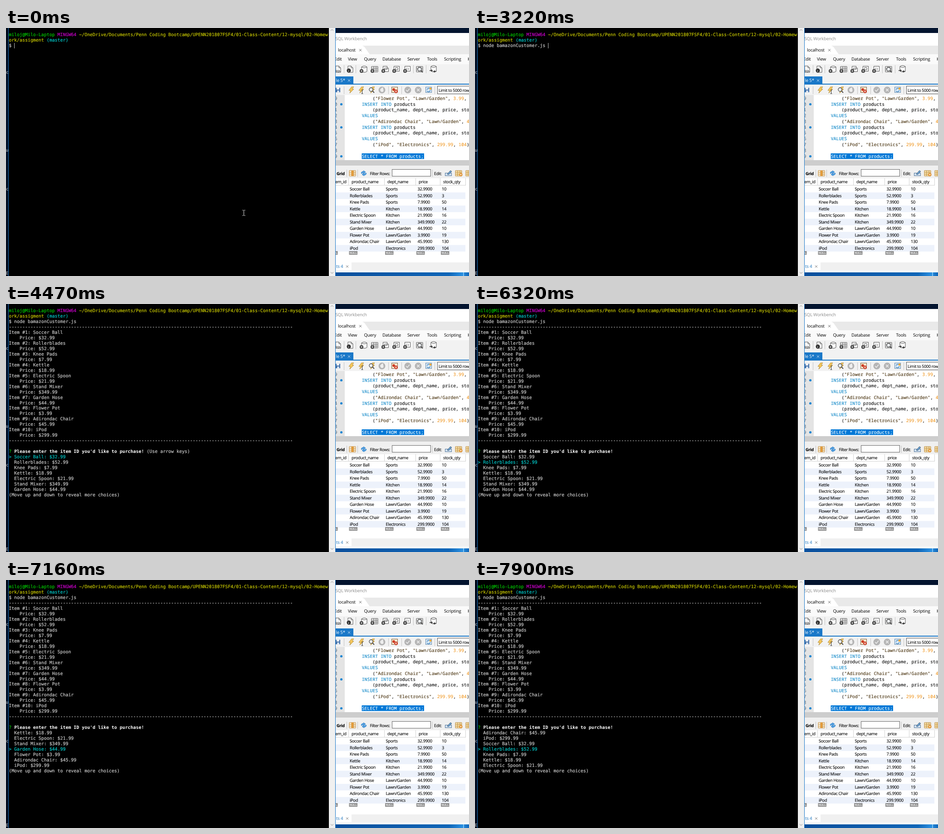
An HTML page that plays this animation: 1021x548 px, repeating every 8000 ms.

```html
<!DOCTYPE html>
<html lang="en">
<head>
<meta charset="utf-8">
<title>Terminal session</title>
<style>
  html, body { margin: 0; width: 100%; height: 100%; overflow: hidden; background: #000; }
  svg { display: block; }
  text { white-space: pre; text-rendering: geometricPrecision; fill: currentColor; }
  .term { font: 9.92px "DejaVu Sans Mono", monospace; color: #c8c8c8; stroke: currentColor; stroke-width: .22; }
  .code { font: 9.88px "Noto Sans Mono", monospace; color: #111; stroke: currentColor; stroke-width: .12; }
  .menu { font: 9.7px "Open Sans", sans-serif; letter-spacing: -.2px; color: #000; }
  .ui { font: 9.3px "Open Sans", sans-serif; letter-spacing: -.3px; color: #000; stroke: currentColor; stroke-width: .12; }
  .small { font-size: 9px; }
  .null { font: bold 6px "Liberation Sans", sans-serif; color: #fff; }
  .g { color: #00c400; } .m { color: #c400c4; } .y { color: #c4c400; } .c { color: #00c4c4; }
  .b { color: #fff; font-weight: bold; stroke: none; }
  .kw { color: #0a85c7; } .num { color: #f09a28; } .str { color: #4a3410; }
</style>
</head>
<body>
<svg id="stage" width="1021" height="548" viewBox="0 0 1021 548">
  <defs>
    <linearGradient id="desk" x2="0" y2="1">
      <stop stop-color="#020a18"/><stop offset=".25" stop-color="#03142e"/><stop offset="1" stop-color="#020a1a"/>
    </linearGradient>
    <linearGradient id="bar">
      <stop stop-color="#0a4f9c"/><stop offset=".85" stop-color="#0f66b8"/><stop offset=".95" stop-color="#2a8fe0"/><stop offset="1" stop-color="#0f66b8"/>
    </linearGradient>
  </defs>
  <g id="app"></g>
  <g id="frame"></g>
  <g id="term" class="term"></g>
  <path id="mouse" d="M521.5 402.5h2l1 1 1-1h2M524.5 403v11M521.5 414.5h2l1-1 1 1h2" fill="none" stroke="#e8e8e8"/>
</svg>
<script>
const $ = id => document.getElementById(id);
const esc = s => s.replace(/&/g, '&amp;').replace(/</g, '&lt;').replace(/>/g, '&gt;');
const rect = (x, y, w, h, fill, more = '') =>
  `<rect x="${x}" y="${y}" width="${w}" height="${h}" fill="${fill}" ${more}/>`;
const path = (d, stroke, fill = 'none', w = 1) =>
  `<path d="${d}" stroke="${stroke}" fill="${fill}" stroke-width="${w}"/>`;
const dot = (x, y, r, fill, more = '') => `<circle cx="${x}" cy="${y}" r="${r}" fill="${fill}" ${more}/>`;
const text = (x, y, s, cls, more = '') => `<text x="${x}" y="${y}" class="${cls}" ${more}>${esc(s)}</text>`;
const cross = (x, y, color) => path(`M${x - 2.5} ${y - 2.5}l5 5m0-5l-5 5`, color);
const rule = (x, y, h) => rect(x, y, 1, h, '#c4c4c4');
const accent = '#1a78c8';

const products = [
  ['Soccer Ball', 'Sports', '32.99', 10], ['Rollerblades', 'Sports', '52.99', 3],
  ['Knee Pads', 'Sports', '7.99', 50], ['Kettle', 'Kitchen', '18.99', 14],
  ['Electric Spoon', 'Kitchen', '21.99', 16], ['Stand Mixer', 'Kitchen', '349.99', 22],
  ['Garden Hose', 'Lawn/Garden', '44.99', 10], ['Flower Pot', 'Lawn/Garden', '3.99', 19],
  ['Adirondac Chair', 'Lawn/Garden', '45.99', 130], ['iPod', 'Electronics', '299.99', 104]
];

/* ---------- database window ---------- */
const plus = (x, y) => dot(x, y, 4, '#333') + path(`M${x - 2.5} ${y}h5M${x} ${y - 2.5}v5`, '#fff');
const sheet = (x, y) => path(`M${x - 5} ${y - 7}h7l4 4v10h-11z`, '#555', '#fafafa') + path(`M${x + 2} ${y - 7}v4h4`, '#555');
const cyl = (x, y) => path(`M${x - 6} ${y - 5}v10q6 4 12 0v-10q-6-4-12 0q6 4 12 0`, '#555', '#fafafa');
const grid = (x, y, line = '#555', fill = '#fafafa') =>
  path(`M${x - 7} ${y - 6}h14v12h-14zM${x - 7} ${y - 2}h14M${x - 7} ${y + 2}h14M${x - 2} ${y - 6}v12M${x + 3} ${y - 6}v12`, line, fill);
const bolt = (x, y) => path(`M${x + 1} ${y - 7}h5l-4 5h4l-9 9 2-6h-4z`, '#a8802a', '#f8c95c', .8);
const lens = (x, y) => dot(x, y, 4, '#f4f8fc', 'stroke="#444" stroke-width="1.3"') + path(`M${x + 3} ${y + 3}l4 4`, '#444', 'none', 1.8);

function mainTools() {
  const y = 91;
  return sheet(732, y) + text(726, y + 6, 'SQL', 'null', 'style="color:#444"') + rule(745, 82, 18) +
    sheet(759, y) + dot(756, y + 3, 4.5, '#333') + text(754.8, y + 5.5, 'i', 'null') + rule(771, 82, 18) +
    cyl(790, y) + plus(784, y + 4) + grid(813, y) + plus(808, y + 4) +
    path('M831.5 84.5h9v7h-9zM834.5 88.5h9v8h-9z', '#555', '#fafafa') + plus(832, y + 4) +
    path('M855.5 84.5h12v11h-12zM859 87.5h5v5h-5z', '#555', '#fafafa') + plus(856, y + 4) +
    path('M879.5 84.5h12v11h-12z', '#555', '#fafafa') + text(882, 92, '( )', 'null', 'style="color:#444"') + plus(880, y + 4) +
    rule(898, 82, 18) + grid(912, y) + lens(912, y) + rule(926, 82, 18) +
    cyl(943, y - 1) + path('M934 94h6l-2-2m2 2l-2 2M946 98l-3-2 3-2m-3 2h6', '#333', 'none', 1.3);
}

function queryTools() {
  const y = 137, grey = '#b4b4b4';
  return rect(727, 132, 10, 10, '#3f6ea8') + rect(729, 132, 6, 4, '#f2f2f2') + rect(730, 138, 5, 4, '#cfdcec') +
    rule(745, 129, 17) + bolt(761, y) + bolt(783, y) + path('M785.5 137v8m-2-8h4m-4 8h4', '#333') +
    bolt(807, y) + lens(805, y - 1) +
    dot(829, y, 7.5, grey) +
    path('M825.5 138v-3q1-1 2 0v-2q1-1 2 0v-1q1-1 2 0v3l1 2-1 4h-4z', '#eee', '#eee', .5) +
    rule(843, 129, 17) + rect(850.5, 130.5, 13, 12, '#f6ead0', 'stroke="#806040"') +
    dot(855, 136, 3, '#cc3b22') + dot(860, 140, 4, '#cc3b22') + cross(860, 140, '#fff') + rule(872, 129, 17) +
    dot(886, y, 7.5, grey) + path('M882 137l3 3 5-6', '#eee', 'none', 1.6) +
    dot(909, y, 7.5, grey) + path('M906 134l6 6m0-6l-6 6', '#eee', 'none', 1.6) +
    rect(925.5, 130.5, 13, 12, '#dcebf7', 'stroke="#628bb0"') + path('M928 136q4-5 8-1m-8 4q4 4 8-1', '#3f82bd', 'none', 1.6) +
    dot(936, 134, 2.4, '#e9a83a') + rule(945, 129, 17) +
    rect(951.5, 128.5, 80, 17, '#fff', 'stroke="#555"') + text(954, 140.5, 'Limit to 5000 rows', 'ui small');
}

function editor() {
  const left = 784.7, pitch = 12.77, cols = '    (product_name, dept_name, price, stock_qty)';
  const lines = [
    '    ("Flower Pot", "Lawn/Garden", 3.99, 19);', 'INSERT INTO products', cols, 'VALUES',
    '    ("Adirondac Chair", "Lawn/Garden", 45.99, 130);', 'INSERT INTO products', cols, 'VALUES',
    '    ("iPod", "Electronics", 299.99, 104);', '', 'SELECT * FROM products;'
  ];
  const kind = s => s[0] === '"' ? 'str' : /\d/.test(s) ? 'num' : 'kw';
  const paint = s => s.replace(/"[^"]*"|[\d.]+|INSERT INTO|VALUES/g, m => `<tspan class="${kind(m)}">${m}</tspan>`);
  let out = rect(727, 148, 294, 144, '#fff') + rect(727, 148, 20, 144, '#e4e4e4') + rect(784.5, 277, 137.5, 12.5, '#0078d7');
  lines.forEach((s, i) => {
    const y = Math.round(158.8 + i * pitch), last = i === lines.length - 1;
    out += text(724.5, y, String((i + 9) % 10), 'code', 'style="color:#5f7385"');
    out += last ? text(left, y, s, 'code', 'style="color:#fff"')
      : `<text x="${left}" y="${y}" class="code">${paint(s)}</text>`;
    if (/^(INSERT|SELECT)/.test(s)) out += dot(739.5, y - 3.5, 2.6, '#1c87d2');
  });
  return out;
}

function results() {
  const pitch = 14.52, top = 348.8, colX = [758, 837.5, 907.5, 961];
  let out = rect(727, 292, 294, 12, '#cdcdcd') + rect(727, 304, 294, 28, '#f0f0f0') +
    text(729, 324.5, 'Grid', 'ui small', 'style="font-weight:bold"') + rule(751, 313, 16) +
    grid(764, 321, '#c08a3c', '#fdf3dc') + rect(762, 315, 4, 12, '#e39a38') + rule(775, 313, 16) +
    path('M783 321q1-5 6-4l-1-2 5 3-4 4v-2q-3-1-4 2zM795 321q-1 5-6 4l1 2-5-3 4-4v2q3 1 4-2z', '#2c79c0', '#4a9ce0', .6) +
    text(802.5, 324.5, 'Filter Rows:', 'ui small') + rect(851.5, 312.5, 85, 15, '#fff', 'stroke="#666"') +
    rule(940, 313, 16) + text(944, 324.5, 'Edit:', 'ui small') +
    rect(968.5, 320.5, 14, 6, '#cfe0f2', 'stroke="#5a7a9c"') + path('M973 323l7-8 3 2-7 7z', '#345', '#6ba3d6', .8) +
    grid(998, 321, '#b88a40', '#fae4b0') + dot(1003, 324, 3.5, '#e08a20') + path('M1001 324h4m-2-2v4', '#fff') +
    grid(1021, 321, '#b88a40', '#fae4b0') +
    rect(727, 332, 294, 186, '#fff') + rect(727, 347, 286, 1, '#d2d2d2');
  out += [755, 834, 903, 957, 1013].map(x => rect(x, 332, 1, 16, '#d2d2d2')).join('');
  [[721, 'item_id'], [762, 'product_name'], [841, 'dept_name'], [910, 'price'], [964, 'stock_qty']]
    .forEach(([x, s]) => out += text(x, 343, s, 'ui'));
  products.forEach(([name, dept, price, qty], i) => {
    const y = top + i * pitch;
    if (i % 2) out += rect(727, y, 286, pitch, '#edf2fb');
    [name, dept, price + '00', String(qty)].forEach((s, k) => out += text(colX[k], Math.round(y + 10.3), s, 'ui'));
  });
  [713, 756.5, 836, 905, 959].forEach(x =>
    out += rect(x, 493, 18.5, 8, '#8c8c8c') + text(x + 1.6, 499.2, 'NULL', 'null'));
  return out + rect(727, 518, 294, 22, '#f0f0f0') + rect(727, 518, 35, 17, '#fff') +
    text(728, 529.5, 'ts 4', 'menu', 'style="color:#1b74bd"') + cross(752.5, 527, '#777') +
    rect(727, 535, 294, 5, '#f7f7f7') + rect(727, 540, 294, 8, 'url(#bar)') + rect(1008, 540, 2, 8, '#7cc4f5');
}

$('app').innerHTML =
  rect(0, 0, 1021, 548, 'url(#desk)') + rect(727, 0, 294, 11, '#03142f') + rect(727, 11, 294, 28, '#fff') +
  text(726.5, 27, 'SQL Workbench', 'menu', 'style="color:#8c8c8c"') +
  rect(727, 39, 294, 19, '#e9e9e9') + path('M727 39h57q5 0 8 5l10 14h-75z', 'none', '#fff') +
  text(732, 52, 'localhost', 'menu') + cross(781.5, 49, '#666') + rect(727, 58, 294, 22, '#fafafa') +
  [[724, 'Edit'], [754, 'View'], [789.5, 'Query'], [830, 'Database'], [885, 'Server'], [928.5, 'Tools'], [966, 'Scripting'], [1018, 'Help']]
    .map(([x, s]) => text(x, 72, s, 'menu')).join('') +
  rect(727, 80, 294, 68, '#f2f2f2') + mainTools() +
  rect(727, 107, 39, 17, accent) + rect(727, 123, 294, 2, accent) +
  text(727.5, 119, 'le 5*', 'menu', 'style="color:#fff"') + cross(756.5, 116, '#cfe4f7') +
  queryTools() + editor() + results();

$('frame').innerHTML =
  [[101, 'tc'], [273, 'u'], [359, 'lc'], [545, 'E']]
    .map(([y, s]) => text(5, y, s, 'menu', 'text-anchor="end" style="color:#ddd"')).join('') +
  rect(5, 0, 1, 548, accent) + rect(6, 0, 706, 548, '#000') + rect(712, 0, 14, 548, '#f0f0f0') +
  path('M716 6l3-3 3 3M716 539.5l3 3 3-3', '#b5b5b5', 'none', 1.2) + rect(726, 0, 1, 548, accent);

/* ---------- terminal ---------- */
const colAt = c => 6.2 + 5.972 * c;
const line = (row, ...parts) => `<text x="6.2" y="${Math.round(18.1 + row * 11.965)}">` +
  parts.map(p => Array.isArray(p) ? `<tspan class="${p[0]}">${esc(p[1])}</tspan>` : esc(p)).join('') + '</text>';

const command = 'node bamazonCustomer.js ';
// [time, typed characters, cursor: 0 hidden, 1 after the text, 2 on the next row]
const typing = [
  [0, 0, 1], [160, 1, 1], [310, 2, 1], [390, 3, 1], [540, 4, 1], [1110, 4, 0], [1290, 5, 1],
  [1520, 6, 1], [1635, 7, 1], [1750, 8, 1], [2160, 12, 1], [2690, 12, 0], [2950, 13, 1],
  [3220, 24, 1], [3730, 24, 0], [3795, 24, 2], [4440, 24, 0]
];
const listAt = 4440;
// times at which the menu opens and then moves down one entry
const moves = [4470, 6320, 6470, 6600, 6830, 6980, 7160, 7290, 7440, 7590, 7770, 7900];

const header = line(0, ['g', 'miloj@Milo-Laptop'], ' ', ['m', 'MINGW64'], ' ',
    ['y', '~/OneDrive/Documents/Penn Coding Bootcamp/UPENN201807FSF4/01-Class-Content/12-mysql/02-Homew']) +
  line(1, ['y', 'ork/assigment'], ' ', ['c', '(master)']);
const dashes = '-'.repeat(105);
const listing = line(3, dashes) + products.map(([name, , price], i) =>
  line(4 + 2 * i, `Item #${i + 1}: ${name}`) + line(5 + 2 * i, `    Price: $${price}`)).join('') + line(24, dashes);

function menu(pick) {
  const first = Math.max(0, pick - 3);
  let out = line(26, ['g', '?'], ' ', ['b', "Please enter the item ID you'd like to purchase!"], pick ? '' : ' (Use arrow keys)');
  for (let i = 0; i < 7; i++) {
    const [name, , price] = products[(first + i) % products.length];
    const label = `${name}: $${price}`;
    out += first + i === pick ? line(27 + i, ['c', '> ' + label]) : line(27 + i, '  ' + label);
  }
  return out + line(34, '(Move up and down to reveal more choices)');
}

let shown = '';
function draw(t) {
  const [, count, cursor] = typing.filter(s => s[0] <= t).pop();
  const pick = moves.filter(m => m <= t).length - 1;
  const key = [count, cursor, t >= listAt, pick].join();
  if (key === shown) return;
  shown = key;
  let out = header + line(2, '$ ' + command.slice(0, count));
  const bar = (x, y) => rect(x, y, 1, 12, '#bfbfbf', 'stroke="none"');
  if (cursor === 1) out += bar(Math.round(colAt(2 + count)), 33);
  if (cursor === 2) out += bar(6, 45);
  if (t >= listAt) out += listing;
  if (pick >= 0) out += menu(pick);
  $('term').innerHTML = out;
  $('mouse').style.display = t < 160 ? '' : 'none';
}

const start = performance.now();
function tick() {
  draw((performance.now() - start) % 8000);
  requestAnimationFrame(tick);
}
tick();
</script>
</body>
</html>
```
